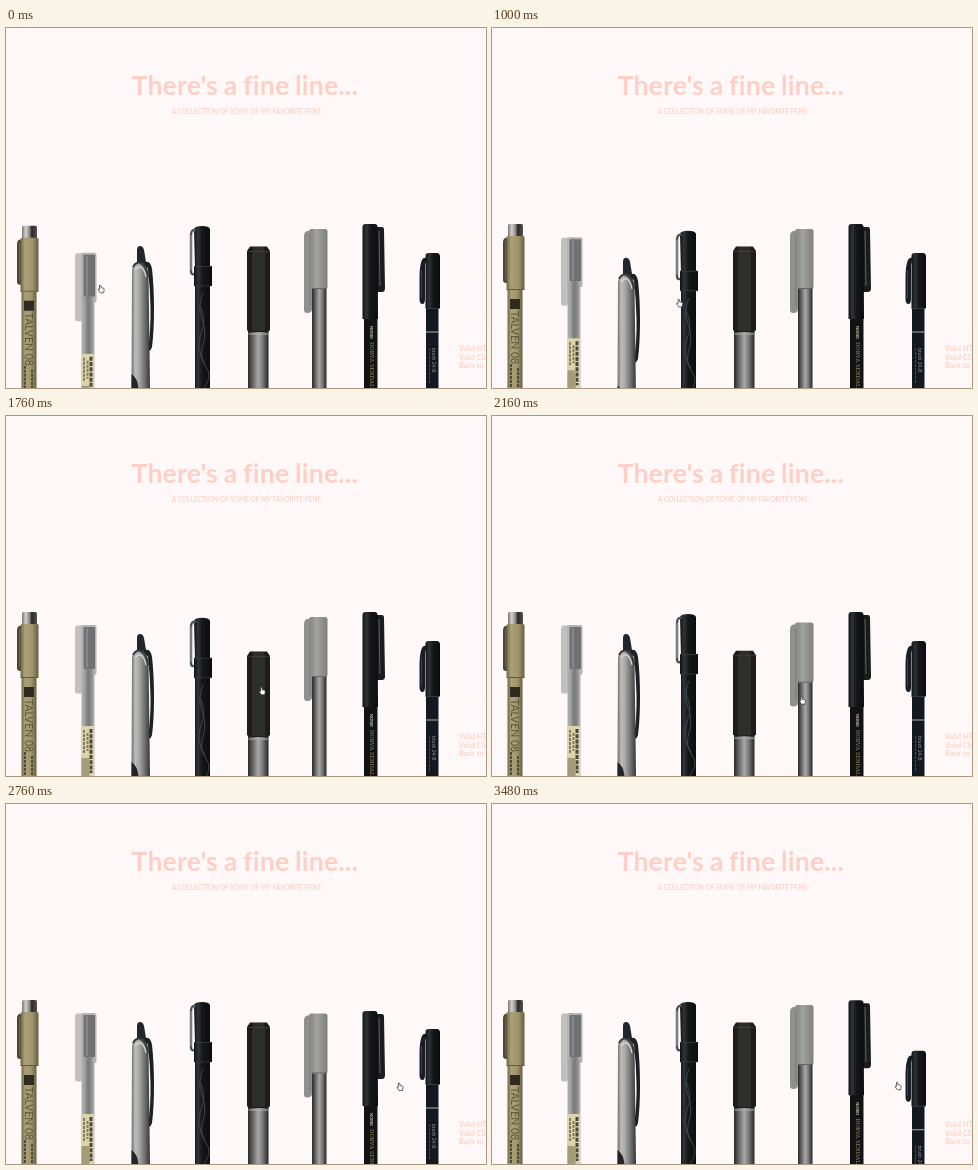
Write an HTML page that moves like this. It is 480 px wide and 360 px high and loops after 3.52 s.

```html
<!DOCTYPE html>
<html lang="en">
<head>
<meta charset="utf-8">
<title>There's a fine line...</title>
<style>
  html, body { margin: 0; height: 100%; overflow: hidden; background: #fef9f8; }
  svg { display: block; width: 480px; height: 360px; font-family: Lato, sans-serif; }
  .copy { fill: #ffcfc7; }
  .title { font-size: 26.6px; font-weight: 700; font-variant-ligatures: none; letter-spacing: .2px; word-spacing: -1px; }
  .sub { font-size: 6.55px; fill: #ffc8bf; text-anchor: middle; }
  .links { font-size: 7px; font-weight: 700; letter-spacing: .15px; }
</style>
</head>
<body>
<svg viewBox="0 0 480 360">
  <defs>
    <linearGradient id="khaki">
      <stop offset="0" stop-color="#6f6748"/><stop offset=".25" stop-color="#aba078"/>
      <stop offset=".65" stop-color="#a0956d"/><stop offset="1" stop-color="#665e41"/>
    </linearGradient>
    <linearGradient id="chrome">
      <stop offset="0" stop-color="#77756f"/><stop offset=".25" stop-color="#d4d2cf"/>
      <stop offset=".5" stop-color="#8d8b88"/><stop offset=".65" stop-color="#2b2a2a"/>
      <stop offset="1" stop-color="#55524d"/>
    </linearGradient>
    <linearGradient id="smoke">
      <stop offset="0" stop-color="#b4b3b3"/><stop offset=".25" stop-color="#a0a0a1"/>
      <stop offset=".5" stop-color="#77787b"/><stop offset=".75" stop-color="#8a8b8d"/>
      <stop offset="1" stop-color="#bab8b7"/>
    </linearGradient>
    <linearGradient id="silver">
      <stop offset="0" stop-color="#6d6d6d"/><stop offset=".2" stop-color="#bebdbb"/>
      <stop offset=".4" stop-color="#aaa9a8"/><stop offset=".7" stop-color="#737375"/>
      <stop offset="1" stop-color="#343538"/>
    </linearGradient>
    <linearGradient id="steel">
      <stop offset="0" stop-color="#29292a"/><stop offset=".2" stop-color="#5c5c5d"/>
      <stop offset=".5" stop-color="#a9a8a8"/><stop offset=".72" stop-color="#79797a"/>
      <stop offset="1" stop-color="#252526"/>
    </linearGradient>
    <linearGradient id="grey">
      <stop offset="0" stop-color="#7c7c7a"/><stop offset=".4" stop-color="#a3a3a0"/>
      <stop offset="1" stop-color="#7e7e7c"/>
    </linearGradient>
    <linearGradient id="black">
      <stop offset="0" stop-color="#101215"/><stop offset=".25" stop-color="#303338"/>
      <stop offset=".5" stop-color="#15171b"/><stop offset="1" stop-color="#0c0d10"/>
    </linearGradient>
  </defs>

  <g class="copy">
    <text class="title" x="125.500" y="66.500">There's a fine line...</text>
    <text class="sub" x="240.500" y="85.700">A COLLECTION OF SOME OF MY FAVORITE PENS</text>
    <g class="links">
      <text x="453" y="323">Valid HTML</text>
      <text x="453" y="331.600">Valid CSS</text>
      <text x="453" y="340.200">Back to top</text>
    </g>
  </g>

  <g class="pen">
    <path d="M16 210h-3q-2 1-2 5v37q0 3 3 3h2z" fill="#4b4633"/>
    <path d="M13.500 213v38" stroke="#6f6749"/>
    <rect x="16" y="196" width="15" height="14" rx="1.500" fill="url(#chrome)"/>
    <rect x="15.500" y="262" width="15" height="98" fill="url(#khaki)"/>
    <rect x="14.500" y="208" width="18" height="54" rx="1.500" fill="url(#khaki)"/>
    <path d="M14.500 261.500h18" stroke="#625a3c"/>
    <rect x="18" y="271" width="10" height="10" fill="#2f2b20"/>
    <text transform="translate(19 283) rotate(90)" font-size="10.500" fill="#5d553b">TALVEN 08</text>
    <path d="M19 336v24M26 340v20" stroke="#544d35" stroke-width="2" stroke-dasharray="3 1"/>
  </g>

  <g class="pen">
    <path d="M76 209.500h-5q-2 0-2 4v62q0 2 2 2h4l1-2z" fill="#c2bfbd"/>
    <rect x="75" y="209" width="15.500" height="50" rx="2" fill="#b5b3b3"/>
    <rect x="77.500" y="211" width="11.500" height="42" rx="1" fill="#707175"/>
    <path d="M81 212v40" stroke="#86878b" stroke-width="2"/>
    <rect x="75.500" y="253" width="13" height="107" fill="url(#smoke)"/>
    <rect x="75.500" y="310" width="12.500" height="50" fill="#ddd3aa"/>
    <path d="M78 314v24M81.500 317v18" stroke="#857d60" stroke-width="2" stroke-dasharray="3 1"/>
    <path d="M85 313v44" stroke="#4d493c" stroke-width="3" stroke-dasharray="4 1.200"/>
    <path d="M75.500 342h8v18h-8z" fill="#a49b78"/>
  </g>

  <g class="pen">
    <path d="M131 238v-16q0-4 3-4t4 4l3 18z" fill="#22252b"/>
    <path d="M138 235q6-4 8 6 2 18 2 40 0 22-2 38-2 6-4 2 3-20 2.500-42-.5-20-2.500-38z" fill="#1d2026"/>
    <path d="M125.500 360l.5-118q1-8 8-8 7 2 8.500 12l1.500 114z" fill="url(#silver)"/>
    <path d="M127 239q4-7 9-3 5 3 6 13" fill="none" stroke="#35373b" stroke-width="2"/>
    <path d="M129 242q4-5 7-2 3 3 4 9" fill="none" stroke="#dddcda" stroke-width="1.200"/>
    <path d="M125.500 346q6 4 7 14h-7z" fill="#23252a"/>
  </g>

  <g class="pen">
    <path d="M189 360V240l-1-39q1-3 8-3t8 3v159z" fill="url(#black)"/>
    <path d="M190 202q-5-1-5 5v36q0 4 3 3" fill="none" stroke="#4c4f55" stroke-width="2.400"/>
    <path d="M185 207v35" stroke="#a8a9ac"/>
    <path d="M188 238h18v20h-18z" fill="url(#black)"/>
    <path d="M188 238.500h17M188 258h17" stroke="#3c4046" stroke-width=".7"/>
    <path d="M197 265q-6 13-1 26t1 26 3 22-2 21M194 278q7 13 1 28t4 30" fill="none" stroke="#4b4f55" stroke-width=".8"/>
  </g>

  <g class="pen">
    <rect x="242" y="302" width="20.500" height="58" fill="url(#steel)"/>
    <path d="M241 302v-79l3-4.500h17l3 4.500v79l-2 2h-19z" fill="#1c1c1c"/>
    <path d="M246 223l2-4h9l2 4v80h-13z" fill="#2e2e2d"/>
    <path d="M241 223.500h23" stroke="#444" stroke-width=".7"/>
    <path d="M242.500 306h19.500" stroke="#b1b1b2"/>
  </g>

  <g class="pen">
    <rect x="306" y="255" width="14.500" height="105" fill="url(#steel)"/>
    <rect x="303" y="201" width="18.500" height="60" rx="2.500" fill="url(#grey)"/>
    <path d="M304 203h-3q-3 1-3 5v74q0 3 3 3 5 0 5-4v-78z" fill="#90908d"/>
    <path d="M304 206v72" stroke="#747472" stroke-width=".8"/>
    <path d="M306 260.500h15" stroke="#666664"/>
  </g>

  <g class="pen">
    <path d="M370 199h6q2 0 2 3l1 58q0 4-3 4h-5z" fill="#1b1c1e"/>
    <path d="M373 203l1 55" stroke="#606164"/>
    <rect x="358" y="288" width="13.500" height="72" fill="#121315"/>
    <path d="M356.500 291v-92q0-3 3-3h9q3 0 3 3l.5 92z" fill="url(#black)"/>
    <text transform="translate(364 298) rotate(90)" font-size="4" font-weight="700" fill="#d5ceb0">NORBI</text>
    <text transform="translate(363.500 314) rotate(90)" font-size="6" font-family="Noto Serif, serif" fill="#9a8856">DORVA SENDALO</text>
  </g>

  <g class="pen">
    <path d="M421 230q-5-1-6 5-1.500 5-1.500 16v20q0 5 3 5 2.500 0 2.500-5v-34z" fill="#191d25"/>
    <path d="M415.500 242v28" stroke="#434953" stroke-width=".8"/>
    <rect x="420" y="278" width="12.500" height="82" fill="#141821"/>
    <path d="M419.500 280v-52q0-3 3-3h8.500q2.500 0 3 3v52z" fill="url(#black)"/>
    <path d="M419.500 280.500h14" stroke="#353a43"/>
    <path d="M420 304h12.500" stroke="#aeb0b4"/>
    <text transform="translate(426 320) rotate(90)" font-size="5" fill="#8d929a">brush 24-B</text>
    <path d="M423.500 320v35" stroke="#535963" stroke-width=".8" stroke-dasharray="3 1"/>
  </g>

  <g id="hand">
    <path transform="scale(.75)" d="M-2-5q1.200-.8 1.700.5L.2-1.700l2.600.5q1.500.4 1.400 1.800L3.700 3v2H-1l-2.600-3.500q-.8-1.500.6-1.600l1 .7z"
          fill="#fff" stroke="#333" stroke-linejoin="round"/>
  </g>
</svg>
<script>
  const LOOP = 3520, EASE_TIME = 700, DROP = 22;
  // When the pointer enters each pen; entering the next one leaves the last.
  const enters = [-700, -455, 350, 790, 1275, 1930, 2410, 2825, Infinity];
  // Pointer path: time, x, y
  const path = [
    [0, 95, 261], [350, 108, 264], [560, 140, 271], [640, 148, 272],
    [840, 168, 274], [1120, 202, 276], [1320, 228, 276], [1680, 256, 275],
    [1760, 256, 275], [1930, 282, 280], [2240, 320, 286], [2480, 357, 288],
    [2800, 399, 282], [3080, 428, 276], [3480, 406, 282], [3520, 405, 282]
  ];
  const pens = document.querySelectorAll('.pen');
  const hand = document.getElementById('hand');

  function ease(ms) {
    const x = Math.min(Math.max(ms / EASE_TIME, 0), 1);
    return x * x * (3 - 2 * x);
  }

  function drop(i, t) {
    const enter = enters[i], leave = enters[i + 1];
    return DROP * ease(Math.min(t, leave) - enter) * (1 - ease(t - leave));
  }

  function pointer(t) {
    const i = path.findIndex(p => p[0] > t);
    const a = path[i - 1], b = path[i], k = (t - a[0]) / (b[0] - a[0]);
    return [a[1] + (b[1] - a[1]) * k, a[2] + (b[2] - a[2]) * k];
  }

  const start = performance.now();
  function draw() {
    const t = (performance.now() - start) % LOOP;
    pens.forEach((pen, i) => pen.setAttribute('transform', `translate(0 ${drop(i, t).toFixed(2)})`));
    hand.setAttribute('transform', `translate(${pointer(t)})`);
    requestAnimationFrame(draw);
  }
  draw();
</script>
</body>
</html>
```
